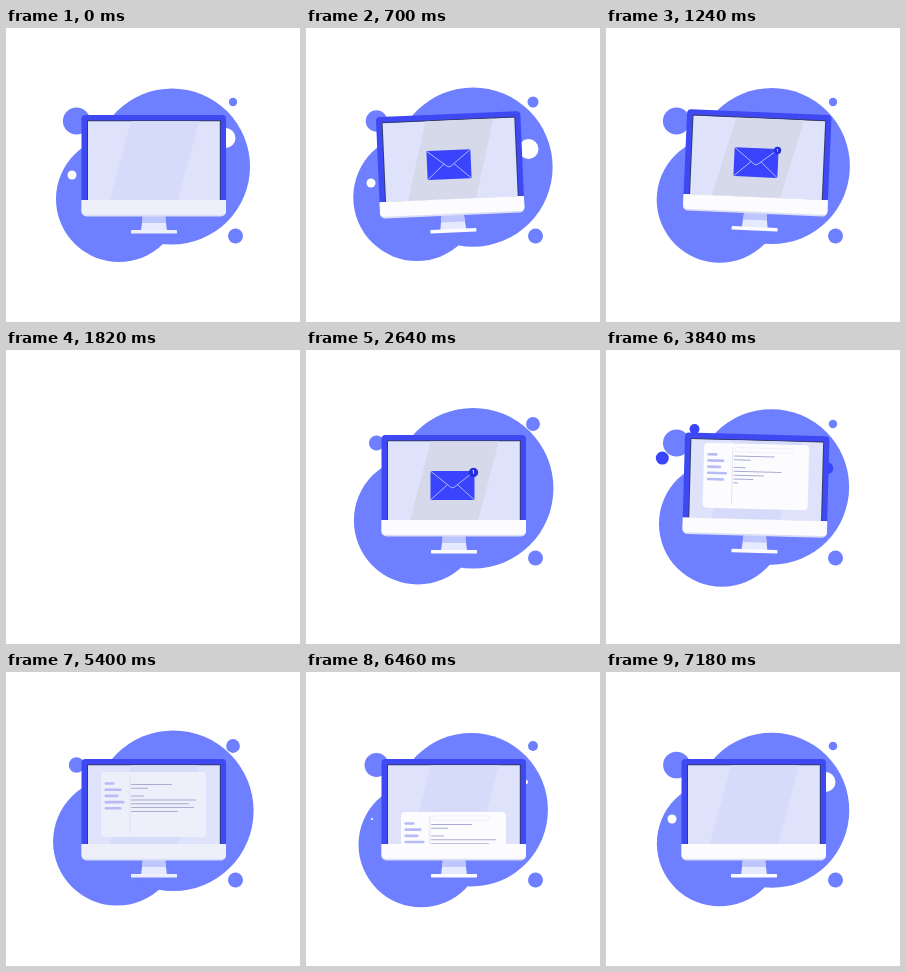
Recreate the animation shown at these times as an HTML page with a canvas. Size 294 by 294 pixels, loop 7.22 s.

```html
<!DOCTYPE html>
<html>
<head>
<meta charset="utf-8">
<style>
html, body { margin: 0; width: 100%; height: 100%; overflow: hidden; background: #fff; }
canvas { display: block; width: 294px; height: 294px; }
</style>
</head>
<body>
<canvas id="stage"></canvas>
<script>
const LOOP = 7220, SIZE = 294, TAU = 2 * Math.PI;
const PALE = '#6e7fff', VIVID = '#3944fc', FRAME = '#3e49f3';
const LABEL_WIDTHS = [10, 17, 14, 20, 17];
const TEXT_WIDTHS = [41, 17, 0, 13, 65, 58, 63, 47];
// Start x, y, end x, y, radius
const SPARKS = [[90, 115, 36.5, 104, 6.5], [120, 135, 70, 46, 5], [174, 129, 249, 112, 6]];

const canvas = document.getElementById('stage');
const ratio = window.devicePixelRatio || 1;
canvas.width = canvas.height = SIZE * ratio;
const c = canvas.getContext('2d');

const progress = (t, from, to) => Math.max(0, Math.min(1, (t - from) / (to - from)));

// Smooth step from 0 to 1
function ramp(t, from, to) {
  const p = progress(t, from, to);
  return p * p * (3 - 2 * p);
}

// From 0 to 1 with overshoot
function pop(t, from, to) {
  const q = 1 - progress(t, from, to);
  return 1 - 2.7 * q ** 3 + 1.7 * q ** 2;
}

// One full swing to the left and right
const rock = (age, degrees) => age > 0 && age < 1100 ? -degrees * Math.sin(TAU * age / 1100) : 0;

function dot(x, y, r, color) {
  c.fillStyle = color;
  c.beginPath();
  c.arc(x, y, Math.max(0, r), 0, TAU);
  c.fill();
}

function box(x, y, w, h, radius, color) {
  c.fillStyle = color;
  c.beginPath();
  c.roundRect(x, y, w, h, radius);
  c.fill();
}

function shape(points, color) {
  c.fillStyle = color;
  c.beginPath();
  points.forEach(p => c.lineTo(...p));
  c.fill();
}

function line(points, color, width) {
  c.strokeStyle = color;
  c.lineWidth = width;
  c.beginPath();
  points.forEach(p => c.lineTo(...p));
  c.stroke();
}

const mix = (a, b, p) => `rgb(${a.map((v, i) => Math.round(v + (b[i] - v) * p))})`;

function backdrop(t) {
  const angle = 3 * TAU * t / LOOP;
  const swell = Math.sin(angle) + .5 * Math.sin(2 * angle);
  const drift = Math.sin(Math.PI * t / LOOP) ** 2;
  dot(113 + 2.6 * drift - 3.2 * swell, 171 + 2.6 * drift - 2.6 * swell, 63 + .9 * swell, PALE);
  dot(166 - .5 * drift + 1.5 * swell, 138.5 - 1.5 * drift + swell, 78 + 2.2 * swell, PALE);

  dot(70.5, 93, 13.6 - 5.5 * swell ** 2, PALE);
  dot(227, 74, 4.2 + 2.5 * swell ** 2, PALE);
  dot(229.5, 208, 7.5, PALE);

  const sink = ramp(t, 0, 700) - ramp(t, 2000, 2500);
  const scale = 1 - ramp(t, 800, 1250) + ramp(t, 6200, 7000);
  dot(66 - sink, 147 + 8 * sink, 4.5 * scale, '#fff');
  dot(219.5 + 3 * sink, 110 + 11 * sink, 10 * scale, '#fff');
}

function burst(age) {
  const p = 1 - (1 - progress(age, 0, 500)) ** 3;
  const scale = progress(age, 0, 100) - progress(age, 820, 1000);
  SPARKS.forEach(([x, y, endX, endY, r]) =>
    dot(x + (endX - x) * p, y + (endY - y) * p, r * scale, VIVID));
}

function mailWindow(t, white) {
  c.save();
  c.translate(0, 75 * (1 - pop(t, 3155, 4010) + ramp(t, 6200, 6700)));
  box(95, 100, 105, 65, 4, white);
  c.strokeStyle = '#e8e9f4';
  c.lineWidth = .6;
  c.beginPath();
  c.roundRect(126, 104, 58, 4.5, 2);
  c.stroke();
  line([[123.8, 104], [123.8, 161]], '#d9dbee', .7);
  LABEL_WIDTHS.forEach((w, i) => box(98.5, 110.2 + 6.2 * i, w, 2.6, 1, '#b6bcf6'));
  // Each row is typed a little later than the one above
  TEXT_WIDTHS.forEach((w, i) => {
    const typed = progress(t, 3240 + 80 * i, 3620 + 80 * i);
    box(125, 112 + 3.85 * i, w * typed, 1, .5, '#a9abd3');
  });
  c.restore();
}

function envelope(t) {
  const scale = pop(t, 380, 660);
  c.save();
  c.translate(146.5, 137.5 + 57 * ramp(t, 3100, 3600) ** 2);
  c.scale(scale, scale);
  box(-22, -14.5, 44, 29, 1, VIVID);
  line([[-21.5, -14], [-2, 1.5], [0, 2.3], [2, 1.5], [21.5, -14]], '#c9ceff', .8);
  for (const side of [-1, 1]) line([[21.5 * side, 14], [5 * side, -.8]], '#c9ceff', .8);

  const badge = pop(t, 1180, 1440);
  c.translate(21, -13);
  c.scale(badge, badge);
  dot(0, 0, 4.7, '#2631dc');
  c.fillStyle = '#fff';
  c.font = 'bold 5px Roboto, sans-serif';
  c.textAlign = 'center';
  c.textBaseline = 'middle';
  c.fillText('1', 0, .3);
  c.restore();
}

function screen(t, white) {
  c.save();
  c.beginPath();
  c.rect(82, 93.3, 131.8, 79);
  c.clip();
  c.fillStyle = '#dfe2fb';
  c.fillRect(80, 93, 136, 80);
  const gray = ramp(t, 380, 680) - ramp(t, 3300, 3800);
  shape([[125, 93], [193, 93], [172, 172], [104, 172]], mix([214, 219, 250], [214, 217, 233], gray));
  if (t > 3155 && t < 6700) mailWindow(t, white);
  if (t > 380 && t < 3600) envelope(t);
  c.restore();
}

function monitor(t) {
  const tilt = rock(t - 425, 2.5) + rock(t - 3025, 1.55);
  const lift = 2 * (ramp(t, 250, 700) - ramp(t, 4000, 4600)) + .4 * tilt;
  const bright = ramp(t, 0, 100) - ramp(t, 4800, 5400) + ramp(t, 5500, 6200);
  const white = mix([237, 239, 250], [252, 252, 255], bright);
  c.save();
  c.translate(147.5, 218 - lift);
  c.rotate(tilt * TAU / 360);
  c.translate(-147.5, -218);

  shape([[137, 187], [159, 187], [161, 203], [135, 203]], '#e6eaff');
  shape([[137, 187], [159, 187], [160, 195], [136, 195]], '#bec6ff');
  box(125, 202, 46, 3.5, .6, white);

  box(75.5, 87, 144.5, 95, 4, FRAME);
  box(81, 92.3, 133.8, 81, 1, '#343c6c');
  screen(t, white);

  box(75.5, 172, 144.5, 16.5, [0, 0, 5, 5], '#dcdff4');
  box(75.5, 172, 144.5, 14.8, [0, 0, 4, 4], white);
  c.restore();
}

function draw(t) {
  c.setTransform(ratio, 0, 0, ratio, 0, 0);
  c.fillStyle = '#fff';
  c.fillRect(0, 0, SIZE, SIZE);
  // Brief blank flash
  if (t >= 1820 && t < 1840) return;
  backdrop(t);
  burst(t - 1220);
  burst(t - 3700);
  monitor(t);
}

const start = performance.now();
function tick() {
  draw((performance.now() - start) % LOOP);
  requestAnimationFrame(tick);
}
tick();
</script>
</body>
</html>
```
